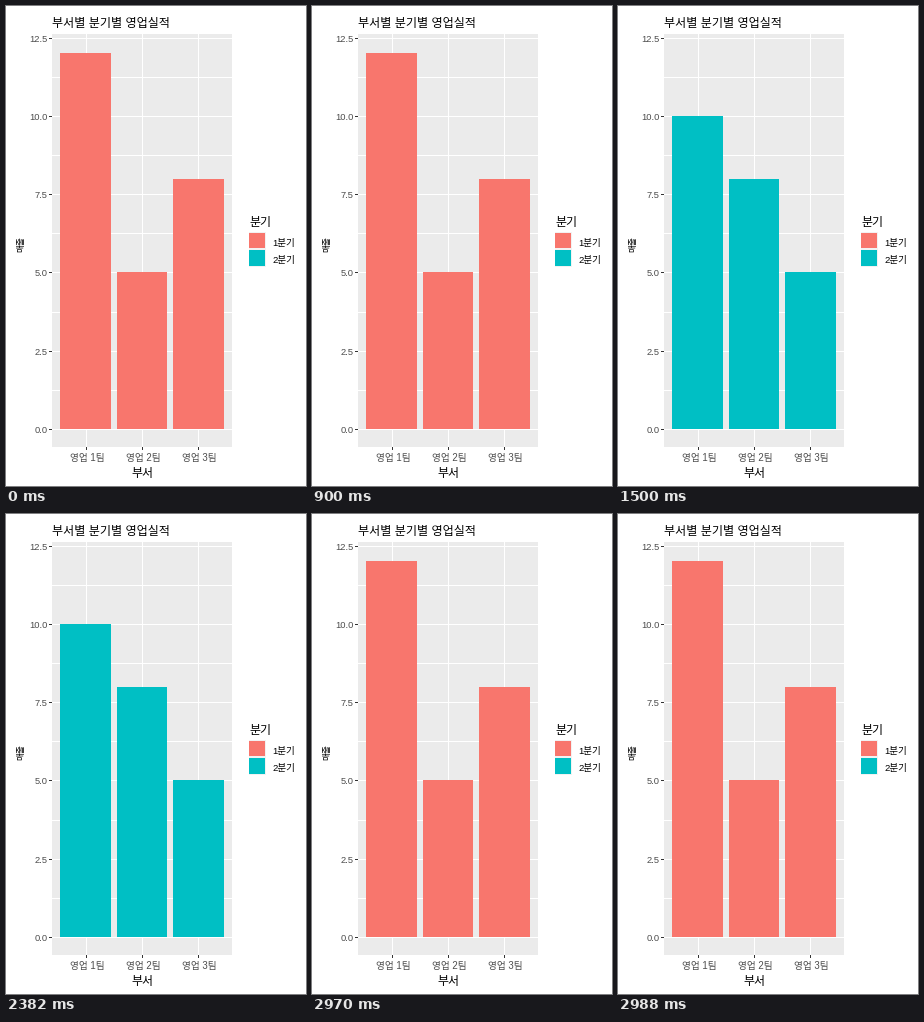
Animation, 300 px wide and 480 px high, one loop 3 s. Source, as a matplotlib script:

```python
import matplotlib.pyplot as plt
from matplotlib.animation import FuncAnimation
from matplotlib.patches import Rectangle

W, H, DPI = 300, 480, 100
STEP, FRAMES = 30, 100
RED, TEAL, PANEL, GREY = "#F8766D", "#00BFC4", "#EBEBEB", "#4D4D4D"
QUARTERS = [((12, 5, 8), RED), ((10, 8, 5), TEAL)]
TEAMS = [(54, 105), (111, 161), (167, 218)]
BASE, UNIT = 423, 31.3

plt.rcParams["font.family"] = ["Liberation Sans", "Noto Sans CJK JP"]
fig = plt.figure(figsize=(W / DPI, H / DPI), dpi=DPI, facecolor="white")
ax = fig.add_axes([0, 0, 1, 1])
ax.set_xlim(0, W)
ax.set_ylim(H, 0)
ax.axis("off")


def rect(x0, y0, x1, y1, color, z=1):
    patch = Rectangle((x0, y0), x1 - x0, y1 - y0, fc=color, lw=0,
                      antialiased=False, zorder=z)
    return ax.add_patch(patch)


def label(x, y, text, px, color="black", ha="left", **kw):
    kw.setdefault("va", "baseline")
    ax.text(x, y, text, fontsize=px * 72 / DPI, color=color, ha=ha, **kw)


def y_of(value):
    return round(BASE - value * UNIT)


# panel and grid
rect(46, 28, 226, 441, PANEL, 0)
for i in range(6):
    value = 2.5 * i
    y = y_of(value)
    rect(46, y, 226, y + 1, "white")
    rect(43, y, 46, y + 1, "#333333")
    label(41.5, y + 4, f"{value:.1f}", 9.4, GREY, "right")
    if i < 5:
        y = y_of(value + 1.25)
        rect(46, y, 226, y + 1, "white")
for i, x in enumerate((80, 136, 192)):
    rect(x, 28, x + 1, 441, "white")
    rect(x, 441, x + 1, 444, "#333333")
    label(x + 1, 455, f"영업 {i + 1}팀", 9.6, GREY, "center")

# titles
label(46, 21, "부서별 분기별 영업실적", 12.1)
label(136, 471, "부서", 12, ha="center")
label(15, 238, "매출", 8.6, ha="center", va="center", rotation=90)

# legend
label(243, 220, "분기", 12)
for i, (y0, y1, color) in enumerate([(227, 242, RED), (244, 260, TEAL)]):
    rect(243, y0 - 1, 260, y1 + 1, "#F2F2F2")
    rect(243, y0, 259, y1, color, 2)
    label(266, 240 + 17 * i, f"{i + 1}분기", 9.5)

bars = [rect(x0, BASE - 1, x1, BASE, RED, 3) for x0, x1 in TEAMS]


def update(frame):
    values, color = QUARTERS[1 if 50 <= frame < 99 else 0]
    for bar, value in zip(bars, values):
        bar.set_y(y_of(value))
        bar.set_height(BASE - y_of(value))
        bar.set_facecolor(color)
    return bars


anim = FuncAnimation(fig, update, frames=FRAMES, interval=STEP,
                     repeat=True, repeat_delay=0, blit=False)
plt.show()
```
